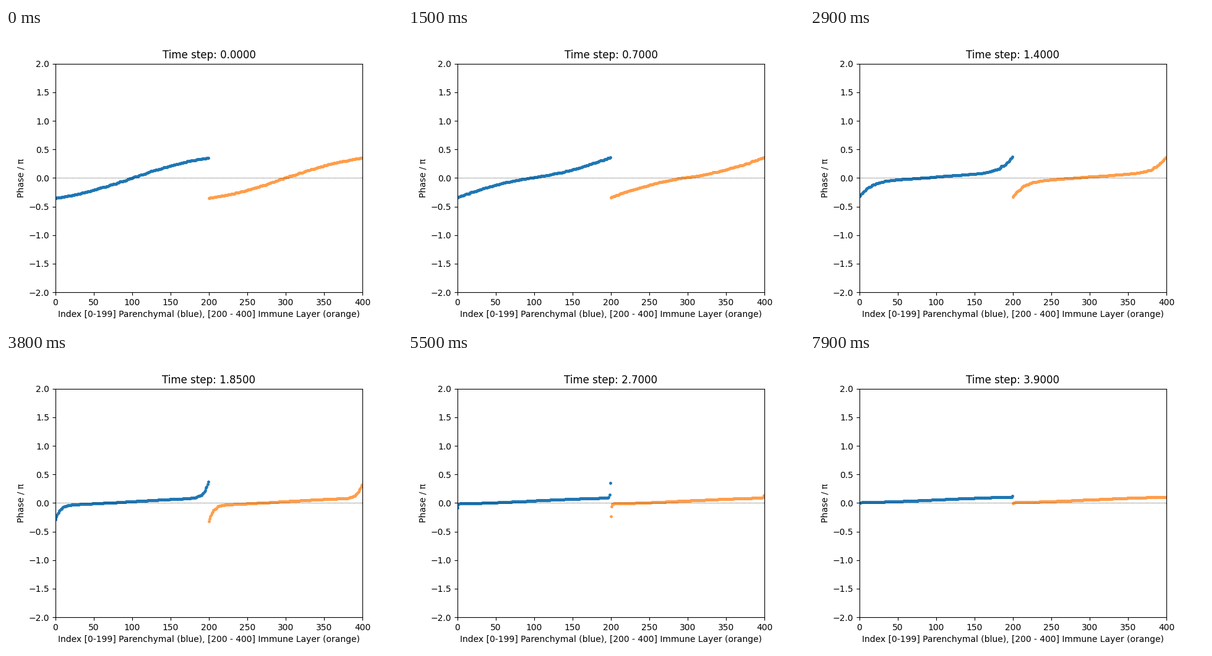
These frames come from a looping animation (640 px wide and 480 px high, 8000 ms). A matplotlib script:

```python
import numpy as np
import matplotlib.pyplot as plt
from matplotlib.animation import FuncAnimation

FRAMES, INTERVAL = 80, 100
COUNT = 200
DT = 0.05
SPREAD = 0.35


def uneven_ranks(seed):
    """Sorted positions in [-1, 1] with small clusters and gaps, regular at the ends."""
    rank = np.arange(COUNT)
    edge = np.minimum(rank, COUNT - 1 - rank)
    noise = np.random.default_rng(seed).normal(0, 1.8, COUNT)
    rank = np.sort(rank + noise * np.clip((edge - 2) / 14, 0, 1))
    return 2 * rank / (COUNT - 1) - 1


def phases(t, v, release_low, release_high):
    """A core that flattens while ever fewer stragglers stay out in the tails."""
    drift = 0.0145 * t
    slope = 0.047 + 0.293 * np.exp(-1.6 * t)
    core = slope * (v + np.sin(np.pi * v / 2)) / 2
    sharpness = np.exp(0.8 * t + 0.4 * t ** 2)
    release = np.where(v < 0, release_low, release_high)
    hold = 1 / (1 + np.exp(3.6 * (t - release)))
    tail = (SPREAD - slope) * hold * np.sign(v) * np.abs(v) ** sharpness
    return drift + core + tail


fig, ax = plt.subplots(figsize=(6.4, 4.8), dpi=100)
ax.set(xlim=(0, 400), ylim=(-2, 2), ylabel="Phase / π",
       xlabel="Index [0-199] Parenchymal (blue), [200 - 400] Immune Layer (orange)")
title = ax.set_title("Time step: 0.0000")
ax.axhline(0, color="black", lw=0.6, ls=":", zorder=2.2)

layers = []
for start, color, seed, low, high in ((0, "#1f77b4", 4, 2.4, 3.2),
                                      (COUNT, "#ff9e4a", 9, 3.0, 2.25)):
    dots, = ax.plot(start + np.arange(COUNT), np.zeros(COUNT), ".",
                    color=color, markersize=5)
    layers.append((dots, uneven_ranks(seed), low, high))


def update(n):
    # the first pose is held for two frames
    t = max(n - 1, 0) * DT
    title.set_text(f"Time step: {t:.4f}")
    for dots, v, low, high in layers:
        dots.set_ydata(phases(t, v, low, high))
    return [title] + [layer[0] for layer in layers]


anim = FuncAnimation(fig, update, frames=FRAMES, interval=INTERVAL,
                     repeat=True, repeat_delay=0, blit=False)
plt.show()
```
